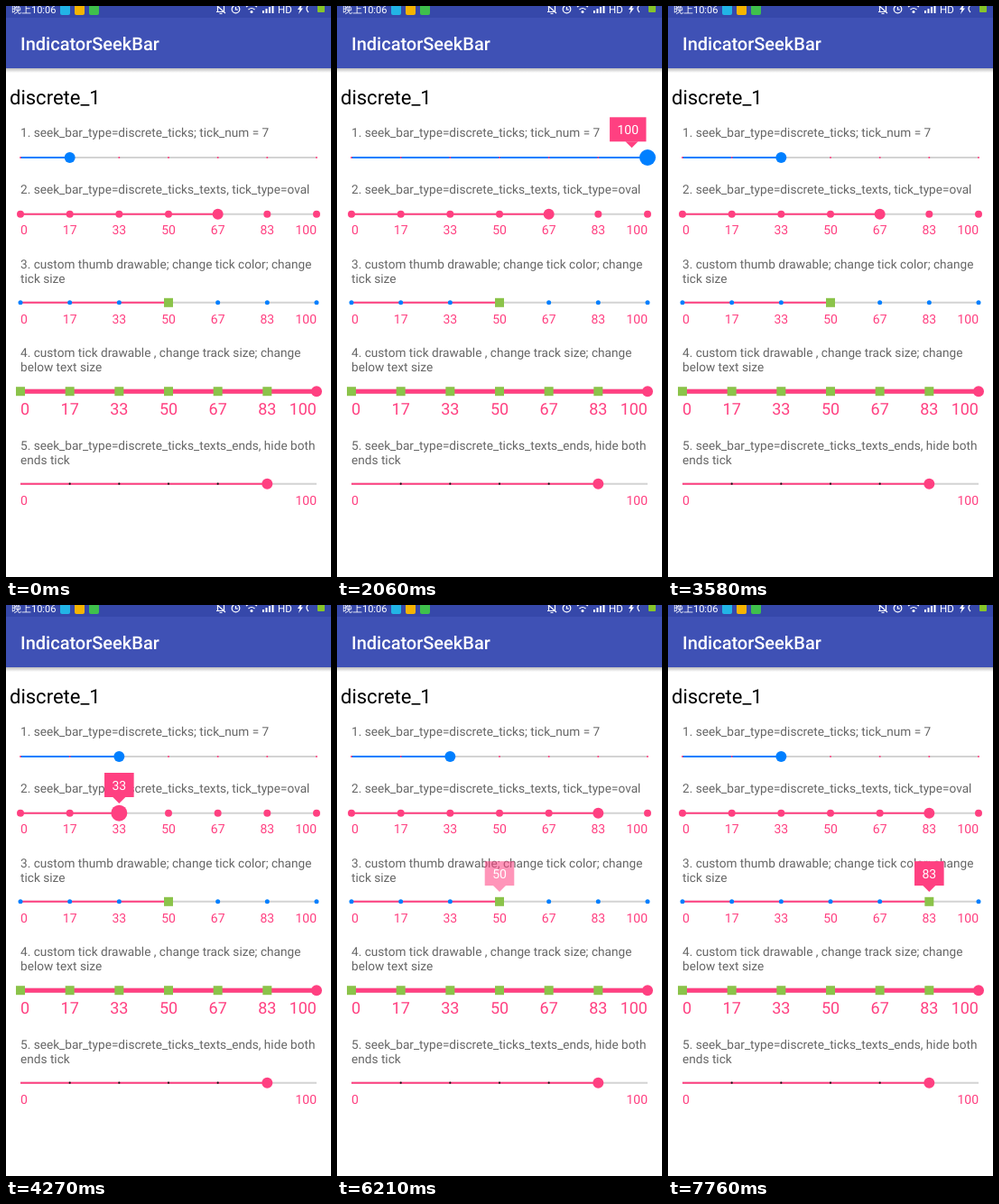
These frames come from a looping animation (360x633 px, 8000 ms). An HTML page:

```html
<!DOCTYPE html>
<html lang="en">
<head>
<meta charset="utf-8">
<title>IndicatorSeekBar</title>
<style>
  html, body { margin: 0; width: 100%; height: 100%; overflow: hidden; background: #fff; }
  svg { display: block; width: 360px; height: 633px; font: 14px Roboto, "Noto Sans", sans-serif; text-rendering: geometricPrecision; }
  .label { fill: #666; font-size: 13.65px; }
  .num { fill: #ff4081; }
  .mid { text-anchor: middle; }
  .end { text-anchor: end; }
  .line { fill: none; stroke: #fff; stroke-width: 1.2; }
</style>
</head>
<body>
<svg id="stage" viewBox="0 0 360 633">
  <defs>
    <linearGradient id="shade" x2="0" y2="1">
      <stop offset="0" stop-color="#000" stop-opacity=".26"/>
      <stop offset="1" stop-color="#000" stop-opacity="0"/>
    </linearGradient>
  </defs>
  <rect y="69" width="360" height="5" fill="url(#shade)"/>
  <rect width="360" height="69" fill="#3f51b5"/>
  <rect width="360" height="13" fill="#3648aa"/>
  <g fill="#fff">
    <text x="6" y="7.5" font-size="11" font-family="Roboto, 'Noto Sans CJK SC', 'Noto Sans CJK', sans-serif">晚上10:06</text>
    <rect x="60" y="-2" width="11" height="12" rx="2" fill="#22b4e6"/>
    <rect x="76" y="-2" width="11" height="12" rx="2" fill="#f5b400"/>
    <rect x="92" y="-2" width="11" height="12" rx="2" fill="#3fc04c"/>
    <path class="line" d="M233 6.5h9M234.5 6V1a3.5 3.5 0 0 1 7 0V6M236.5 8.5h3M232-2l11 10"/>
    <circle class="line" cx="254.5" cy="3.5" r="4.3"/>
    <path class="line" d="M254.5 1v3h2.5"/>
    <path class="line" d="M266 1q6-5 12 0M268.5 4q3.5-3 7 0"/>
    <circle cx="272" cy="6.5" r="1.5"/>
    <path d="M284 5h2v3h-2zM287.5 3h2v5h-2zM291 1h2v7h-2zM294.5-1h2v9h-2z"/>
    <text x="301" y="7.5" font-size="11.5">HD</text>
    <path d="M327-2l-4 6h2.5l-1.5 5 5-6.5h-2.5l2-4.500z"/>
    <path class="line" d="M335-1q-4 4 0 8"/>
    <rect x="345" y="-1" width="8" height="8" rx="1" fill="#86c52a"/>
    <text x="16" y="48.5" font-size="20" font-weight="500">IndicatorSeekBar</text>
  </g>
  <text x="4" y="108.5" font-size="22">discrete_1</text>
</svg>
<script>
const PINK = '#ff4081', BLUE = '#007fff', GREEN = '#8bc34a', GREY = '#d3d3d3';
const LOOP = 8000, WIDTH = 360, LEFT = 16, RIGHT = 344, LAST = 6;
const FADE = 190, GLIDE = 300, BLOCK = 10;
const stage = document.getElementById('stage');

const tickX = i => LEFT + (RIGHT - LEFT) * i / LAST;
const label = i => String(Math.round(100 * i / LAST));
const clamp = (v, lo, hi) => Math.min(hi, Math.max(lo, v));
const mix = (a, b, u) => a + (b - a) * u;
const smooth = u => u * u * (3 - 2 * u);

function set(el, attrs) {
  for (const k in attrs) el.setAttribute(k, attrs[k]);
}

function add(tag, attrs, parent = stage, text = '') {
  const el = document.createElementNS('http://www.w3.org/2000/svg', tag);
  set(el, attrs);
  el.textContent = text;
  parent.append(el);
  return el;
}

const dot = (x, y, r, fill) => add('circle', { cx: x, cy: y, r, fill });
const block = (x, y) => add('rect', {
  x: x - BLOCK / 2, y: y - BLOCK / 2, width: BLOCK, height: BLOCK, fill: GREEN
});

// drag: finger positions as [time, tick], joined linearly; the thumb snaps to the nearest tick
// down, up: when the bubble starts to fade in and out
const bars = [
  {
    y: 168, at: 1, color: BLUE, tick: [1, PINK], down: 740, up: 3390,
    text: [[145, '1. seek_bar_type=discrete_ticks; tick_num = 7']],
    drag: [
      [1105, 1], [1150, 2.5], [1290, 3.5], [1880, 5.5], [2165, 6], [2450, 5.45],
      [2640, 4.45], [2860, 3.55], [2875, 2.4], [3250, 1.45], [3300, 1], [3350, 1.5]
    ]
  },
  {
    y: 230.7, at: 4, tick: [4, PINK], nums: 253, down: 3950, up: 5830,
    text: [[208, '2. seek_bar_type=discrete_ticks_texts, tick_type=oval']],
    drag: [
      [4120, 4], [4270, 2.45], [4510, 1.45], [4730, 1], [4950, 1.5],
      [5150, 2.5], [5450, 3.5], [5560, 4.5]
    ]
  },
  {
    y: 328.8, at: 3, tick: [2.5, BLUE], nums: 351.5, square: true, down: 6210, up: LOOP,
    text: [[290.5, '3. custom thumb drawable; change tick color; change'], [306.5, 'tick size']],
    drag: [
      [6350, 3], [6500, 1.45], [6740, 0.45], [6900, 0], [7080, 0.45], [7095, 1.6],
      [7360, 2], [7460, 2.5], [7550, 3.5], [7760, 4.5]
    ]
  },
  {
    y: 427.2, at: 6, width: 5, nums: 453, size: 18,
    text: [[389, '4. custom tick drawable , change track size; change'], [405, 'below text size']]
  },
  {
    y: 529.7, at: 5, tick: [1.1, '#111'], inner: true, nums: 553,
    text: [[491.5, '5. seek_bar_type=discrete_ticks_texts_ends, hide both'], [507.5, 'ends tick']]
  }
];

function fingerAt(drag, t) {
  const k = drag.findIndex(p => p[0] > t);
  if (k < 0) return drag[drag.length - 1][1];
  if (k === 0) return drag[0][1];
  const [t0, a] = drag[k - 1], [t1, b] = drag[k];
  return mix(a, b, (t - t0) / (t1 - t0));
}

// Each change of tick, with the time it happens.
function findMoves({ at, drag }) {
  const moves = [{ t: 0, i: at, from: at }];
  if (!drag) return moves;
  for (let t = 0; t < LOOP; t++) {
    const from = moves[moves.length - 1].i;
    const i = Math.round(fingerAt(drag, t));
    if (i !== from) moves.push({ t, i, from });
  }
  return moves;
}

function build(bar) {
  const { y, tick, width = 2, color = PINK } = bar;
  for (const [ty, s] of bar.text) add('text', { x: LEFT, y: ty, class: 'label' }, stage, s);
  const track = stroke => add('line', { x1: LEFT, x2: RIGHT, y1: y, y2: y, stroke, 'stroke-width': width });
  track(GREY);
  bar.fill = track(color);
  for (let i = 0; i <= LAST; i++) {
    const x = tickX(i), isEnd = i % LAST === 0;
    if (!tick) { if (i < LAST) block(x, y); }
    else if (!(bar.inner && isEnd)) dot(x, y, ...tick);
    if (bar.nums && (isEnd || !bar.inner)) {
      const cls = i === 0 ? 'num' : i === LAST ? 'num end' : 'num mid';
      add('text', { x, y: bar.nums, class: cls, 'font-size': bar.size || 14 }, stage, label(i));
    }
  }
  bar.thumb = bar.square ? block(0, y) : dot(0, y, 6, color);
  bar.moves = findMoves(bar);
}

bars.forEach(build);

const bubble = add('g', {});
const box = add('rect', { height: 27, fill: PINK }, bubble);
const arrow = add('path', { d: 'M-7 27H7L0 34z', fill: PINK }, bubble);
const value = add('text', { y: 18.5, class: 'mid', fill: '#fff' }, bubble);

const bubbleWidth = i => 17 + 7.8 * label(i).length;
const bubbleX = i => Math.min(tickX(i), WIDTH - bubbleWidth(i) / 2);

// The bubble jumps with the thumb, but glides when its width changes.
function showBubble(bar, t, { t: since, i, from }) {
  const resized = label(i).length !== label(from).length;
  const u = resized ? smooth(clamp((t - since) / GLIDE, 0, 1)) : 1;
  const w = bubbleWidth(i);
  const opacity = t < bar.up
    ? clamp(0.55 + (t - bar.down) / FADE / 2, 0, 1)
    : 1 - (t - bar.up) / FADE;
  set(bubble, { transform: `translate(${mix(bubbleX(from), bubbleX(i), u)} ${bar.y - 44.7})`, opacity });
  set(box, { x: -w / 2, width: w });
  set(arrow, { transform: `translate(${tickX(i) - bubbleX(i)} 0)` });
  value.textContent = label(i);
}

function draw(t) {
  set(bubble, { opacity: 0 });
  for (const bar of bars) {
    const { moves, fill, thumb, down, up } = bar;
    const move = moves.filter(m => m.t <= t).pop();
    const x = tickX(move.i);
    set(fill, { x2: x });
    if (bar.square) set(thumb, { x: x - BLOCK / 2 });
    else set(thumb, { cx: x, r: move.t > 0 && t < up ? 9 : 6 });
    if (t >= down && t < up + FADE) showBubble(bar, t, move);
  }
}

const start = performance.now();
function frame() {
  draw((performance.now() - start) % LOOP);
  requestAnimationFrame(frame);
}
frame();
</script>
</body>
</html>
```
